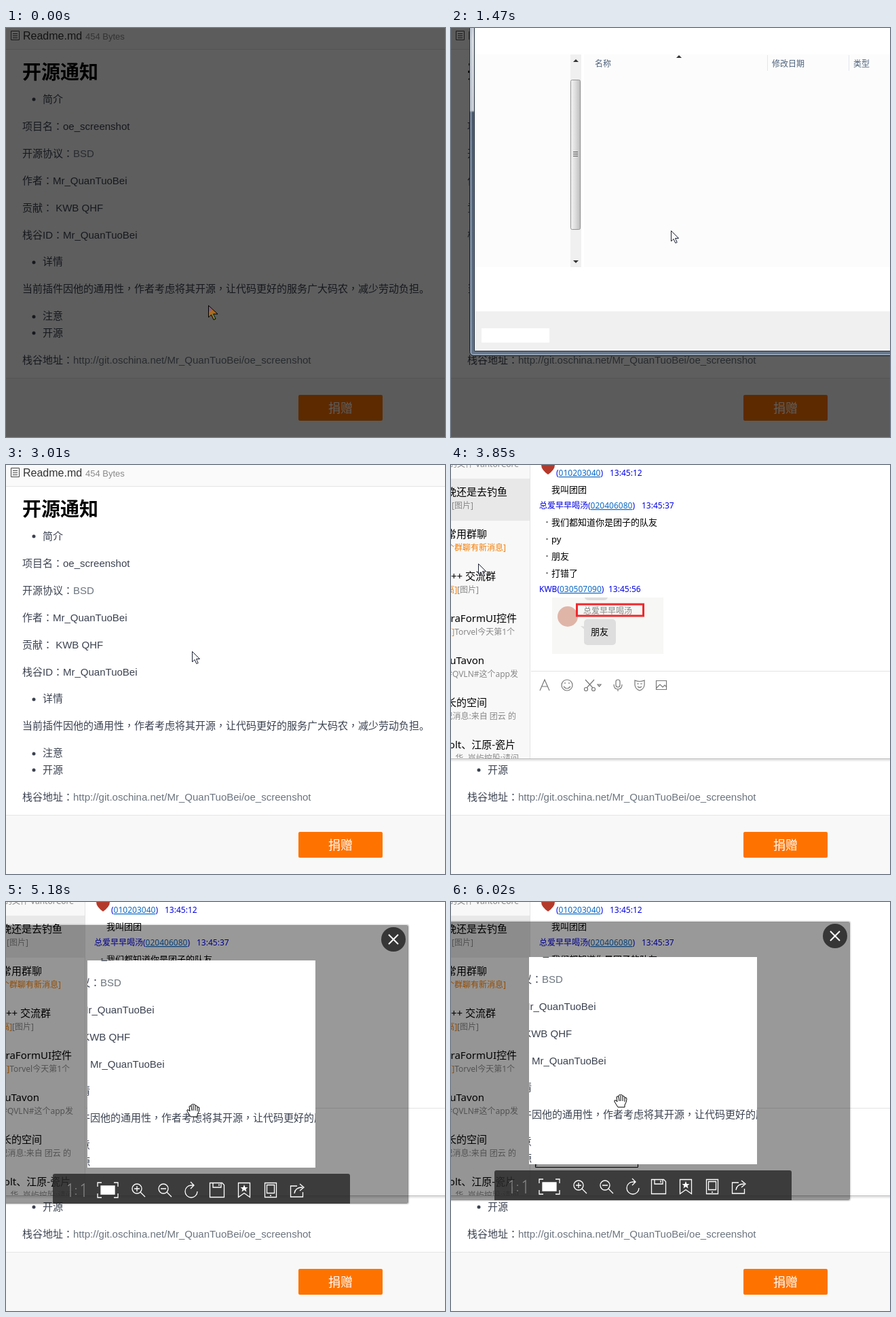
Animation, 647 px wide and 602 px high, one loop 6.09 s. Source, as an HTML page:

```html
<!DOCTYPE html>
<html lang="zh-CN">
<head>
<meta charset="utf-8">
<title>Screenshot demo</title>
<style>
html, body { margin: 0; width: 100%; height: 100%; overflow: hidden; background: #fff; }
#stage { display: block; }
text { font: 15px "Liberation Sans", "Noto Sans CJK SC", "Noto Sans CJK", sans-serif; fill: #3b4250; white-space: pre; }
.link { fill: #6b747e; }
.mid { font-family: "Noto Sans CJK TC", "Noto Sans CJK", sans-serif; }
#page .title { font-size: 28px; font-weight: bold; fill: #000; }
#page .file { font-size: 16px; fill: #333; }
#page .size { font-size: 13px; fill: #888; }
#page .donate { font-size: 18px; fill: #fff; }
#dialog text { font-size: 12px; fill: #4c607a; }
#chat text { font: 13px "Noto Sans", "Noto Sans CJK SC", "Noto Sans CJK", sans-serif; fill: #000; }
#chat .rows text { font-size: 15px; text-anchor: end; }
#chat .rows .sub { font-size: 12px; fill: #888; }
#chat .rows .hot { fill: #f57c00; }
#chat .who text { font-size: 12px; fill: #0000e6; }
#chat .who .num { fill: #0a68c4; text-decoration: underline; }
.line { fill: none; stroke: #777; stroke-width: 1.2; }
.white { fill: none; stroke: #fff; stroke-width: 1.3; }
.bold { stroke-width: 2; }
</style>
</head>
<body>
<svg id="stage" width="647" height="602" viewBox="0 0 647 602">
  <defs>
    <linearGradient id="grip"><stop stop-color="#f4f4f4"/><stop offset=".5" stop-color="#dcdcdc"/><stop offset="1" stop-color="#bcbcbc"/></linearGradient>
    <linearGradient id="glass" x2="0" y2="1"><stop stop-color="#66778b"/><stop offset=".2" stop-color="#d7dce2"/><stop offset=".38" stop-color="#c8ced6"/><stop offset=".385" stop-color="#4e5d70"/><stop offset="1" stop-color="#65758a"/></linearGradient>
  </defs>

  <g id="page">
    <path fill="#fff" d="M0 0H647V602H0z"/>
    <path fill="#fafafa" d="M0 0H647V31H0z"/>
    <path fill="#f8f8f8" d="M0 516H647V602H0z"/>
    <path stroke="#e5e5e5" d="M0 31.5H647M0 515.5H647"/>
    <path fill="none" stroke="#444" d="M7.500 4.500H19.500V17.500H7.500zM10 8.500h7M10 11.500h7M10 14.500h7"/>
    <text class="file" x="25" y="17">Readme.md</text>
    <text class="size" x="117" y="17">454 Bytes</text>
    <text class="title" x="24" y="75">开源通知</text>
    <g fill="#3b4250"><circle cx="41" cy="105" r="2.500"/><circle cx="41" cy="345" r="2.500"/><circle cx="41" cy="425" r="2.500"/><circle cx="41" cy="449" r="2.500"/></g>
    <text x="54" y="110">简介</text>
    <text x="24" y="150">项目名<tspan class="mid" lang="zh-TW">：</tspan>oe_screenshot</text>
    <text x="24" y="190">开源协议<tspan class="mid" lang="zh-TW">：</tspan><tspan class="link">BSD</tspan></text>
    <text x="24" y="230">作者<tspan class="mid" lang="zh-TW">：</tspan>Mr_QuanTuoBei</text>
    <text x="24" y="270">贡献<tspan class="mid" lang="zh-TW">：</tspan> KWB QHF</text>
    <text x="24" y="310">栈谷ID<tspan class="mid" lang="zh-TW">：</tspan>Mr_QuanTuoBei</text>
    <text x="54" y="349">详情</text>
    <text x="24" y="389">当前插件因他的通用性<tspan class="mid" lang="zh-TW">，</tspan>作者考虑将其开源<tspan class="mid" lang="zh-TW">，</tspan>让代码更好的服务广大码农<tspan class="mid" lang="zh-TW">，</tspan>减少劳动负担。</text>
    <text x="54" y="429">注意</text>
    <text x="54" y="454">开源</text>
    <text x="24" y="494">栈谷地址<tspan class="mid" lang="zh-TW">：</tspan><tspan class="link">http://git.oschina.net/Mr_QuanTuoBei/oe_screenshot</tspan></text>
    <rect x="431" y="540" width="124" height="38" rx="2" fill="#fe7300"/>
    <text class="donate" x="475" y="566">捐赠</text>
  </g>

  <g id="shade">
    <path id="veil" fill-opacity=".63" fill-rule="evenodd"/>
    <g id="selection">
      <path id="edge" fill="none" stroke="#1aa5e8"/>
      <path id="handles" stroke="#5a3a38" stroke-width="3" fill="none"/>
    </g>
  </g>

  <g id="dialog">
    <rect x="27.500" y="-100" width="700" height="582.500" rx="6" fill="url(#glass)" stroke="#1d2733"/>
    <path fill="none" stroke="#aab8c8" d="M29.500-100V478q0 2.500 3 2.500H720"/>
    <path fill="#fff" stroke="#25303d" d="M34.500-70H720V475.500H34.500z"/>
    <path fill="#fcfcfc" d="M35 39H176V352H35zM196 39H720V352H196z"/>
    <path fill="#f0f0f0" d="M35 417H720V475H35zM176 39H192V352H176z"/>
    <path fill="#fff" d="M45 442H145V463H45z"/>
    <rect x="176.500" y="76.500" width="14" height="220" rx="2" fill="url(#grip)" stroke="#959595"/>
    <path stroke="#555" d="M180 182.500h7M180 185.500h7M180 188.500h7"/>
    <path fill="#333" d="M180 50l4-4 4 4zM180 342l4 4 4-4zM332 44l4-4 4 4z"/>
    <path stroke="#e2e6ec" d="M466.500 40V63M586.500 40V63"/>
    <text x="212" y="57">名称</text><text x="473" y="57">修改日期</text><text x="593" y="57">类型</text>
  </g>

  <g id="chat">
    <path fill="#000" fill-opacity=".08" d="M0 432H647V436H0z"/>
    <path fill="#fff" d="M0 0H647V432H0z"/>
    <path fill="#f8f8f8" d="M0 0H116V432H0z"/>
    <path fill="#e8e8e8" d="M0 20H116V82H0z"/>
    <path stroke="#e3e3e3" d="M116.500 0V432M118 303.500H647"/>
    <svg class="rows" width="116" height="432">
      <text class="sub" x="100" y="3">的文件 VantorCore</text>
      <text x="83" y="45">晚还是去钓鱼</text><text class="sub" x="33" y="64">：[图片]</text>
      <text x="53" y="107">常用群聊</text><text class="sub hot" x="81" y="126">个群聊有新消息]</text>
      <text x="66" y="169">C++ 交流群</text><text class="sub" x="41" y="188"><tspan class="hot">高]</tspan>[图片]</text>
      <text x="97" y="231">eloraFormUI控件</text><text class="sub" x="94" y="250"><tspan class="hot">高]</tspan>Torvel今天第1个</text>
      <text x="49" y="293">的uTavon</text><text class="sub" x="99" y="312">发#QVLN#这个app发</text>
      <text x="53" y="355">长的空间</text><text class="sub" x="96" y="374">记消息:来自 团云 的</text>
      <text x="95" y="417">wolt、江原-瓷片</text><text class="sub" x="100" y="436">华..岚屿控股:请问</text>
    </svg>
    <path fill="#b5392b" d="M133 0H153Q153 7 143 14Q133 7 133 0z"/>
    <g class="who">
      <text x="155" y="16">(<tspan class="num">010203040</tspan>)</text><text x="234" y="16">13:45:12</text>
      <text x="130" y="64">总爱早早喝汤(<tspan class="num">020406080</tspan>)</text><text x="281" y="64">13:45:37</text>
      <text x="130" y="187">KWB(<tspan class="num">030507090</tspan>)</text><text x="232" y="187">13:45:56</text>
    </g>
    <text x="148" y="41">我叫团团</text>
    <text x="148" y="89">我们都知道你是团子的队友</text>
    <text x="148" y="114">py</text><text x="148" y="139">朋友</text><text x="148" y="164">打错了</text>
    <g fill="#777"><circle cx="141.500" cy="84" r="1.300"/><circle cx="141.500" cy="109" r="1.300"/><circle cx="141.500" cy="134" r="1.300"/><circle cx="141.500" cy="159" r="1.300"/></g>
    <path fill="#f7f7f5" d="M149 195H313V278H149z"/>
    <circle cx="172" cy="223" r="15" fill="#dfb5a8"/>
    <path fill="#ddd" d="M197 195H231Q230 199 225 199H203Q198 199 197 195zM191 237l8 1v6z"/>
    <text x="195" y="219" style="font-size:12px;fill:#888">总爱早早喝汤</text>
    <rect x="185.500" y="205" width="98" height="17" fill="none" stroke="#f0282d" stroke-width="3"/>
    <rect x="196" y="227" width="47" height="38" rx="5" fill="#dedede"/>
    <text x="206" y="250">朋友</text>
    <g class="line">
      <path d="M131 332L138 316 145 332M134 326H142"/>
      <circle cx="171" cy="324" r="8"/><path d="M166 326q5 6 10 0M168 320v2M174 320v2"/>
      <path d="M198 316L209 328M211 316L200 328M216 323h5l-2.500 3z"/><circle cx="199" cy="330" r="2.500"/><circle cx="210" cy="330" r="2.500"/>
      <rect x="243" y="316" width="6" height="11" rx="3"/><path d="M240 323q0 7 6 7t6-7M246 330v3"/>
      <path d="M271 317q7 3 14 0v7q-1 6-7 8-6-2-7-8zM274 322h3M279 322h3M275 326q3 3 6 0"/>
      <path d="M302.500 317.500h15v13h-15zM303 328l5-5 4 4 3-3 3 3"/>
    </g>
    <svg id="thumb" x="120" y="344" width="160" height="50" viewBox="120 344 160 50">
      <path fill="#fff" stroke="#000" d="M124.500 253.500H275.500V390.500H124.500z"/>
      <svg x="125" y="254" width="150" height="136" viewBox="80 152 336 305"><use href="#page"/></svg>
      <g fill="none" stroke="#888">
        <path d="M264 379l5 5" stroke-width="3.500"/>
        <circle cx="260" cy="375" r="6" fill="#fff" stroke-width="2.500"/>
        <path d="M257 375h6M260 372v6" stroke-width="1.500"/>
      </g>
    </svg>
    <path stroke="#b4b4b4" d="M0 432.500H647"/>
  </g>

  <g id="viewer">
    <rect x="-.5" y="-.5" width="610" height="411" rx="3" fill="none" stroke="#000" stroke-opacity=".12" stroke-width="2"/>
    <rect width="609" height="410" rx="3" fill-opacity=".4"/>
    <svg x="136" y="52" width="336" height="305" viewBox="80 152 336 305"><use href="#page"/></svg>
    <svg width="609" height="410">
      <g id="tools">
        <rect x="85" y="366" width="438" height="46" rx="3" fill="#2a2a2a" fill-opacity=".83"/>
        <g class="white">
          <path stroke="#888" d="M107 384l4-3V400M127 384l4-3V400M119 387v2M119 395v2"/>
          <path d="M151 385v-6h6M175 379h6v6M181 395v6h-6M157 401h-6v-6"/><path fill="#fff" d="M156 384h20v12h-20z"/>
          <circle cx="209" cy="388" r="7"/><path d="M214 393l7 7M205 388h8M209 384v8"/>
          <circle cx="248" cy="388" r="7"/><path d="M253 393l7 7M244 388h8"/>
          <path d="M298 392a9 9 0 1 1-9-9h3M288 378l5 5-5 5"/>
          <path d="M316.500 379.500h18l3 3v18h-21zM321 380v6h12v-6M330 381v3"/>
          <path d="M358.500 379.500h17v21l-8.500-6-8.500 6z"/>
          <path fill="#fff" stroke="none" d="M367 382l1.500 4h4l-3 2.500 1 4-3.500-2.500-3.500 2.500 1-4-3-2.500h4z"/>
          <path d="M397.500 379.500h17v21h-17zM400.500 382.500h11v12h-11zM405 398h2"/>
          <path d="M445 384h-9.500v16h18v-7M441 395q1-9 12-9M449 381l6 5-6 5"/>
        </g>
      </g>
    </svg>
    <g id="prev"><circle class="white bold" cx="30" cy="204" r="21"/><path class="white bold" d="M35 191L22 204 35 217"/></g>
    <g id="close"><circle cx="587" cy="21" r="18" fill="#2e2e2e" fill-opacity=".92"/><path class="white bold" d="M580 14l14 14M594 14l-14 14"/></g>
  </g>

  <g id="cursor" stroke-linejoin="round">
    <g id="pick"><path fill="#b06a1c" stroke="#000" d="M.5.5V18l4-4 3.500 7.500 3-1.500-3.500-7H14z"/><path fill="#75609a" d="M1 2v7l5-2z"/><path fill="#2f9b78" d="M6 13l3 7 1-1-3-6z"/></g>
    <path id="move" fill="#fff" stroke="#222" d="M0-11L4-6H2V-2H6V-4L11 0 6 4V2H2V6H4L0 11-4 6H-2V2H-6V4L-11 0-6-4V-2H-2V-6H-4z"/>
    <path id="arrow" fill="#fff" stroke="#1c2233" d="M.5.5V16l3.500-3.500 2.800 6 2.400-1-2.700-6H11.500z"/>
    <path id="hand" fill="#fff" stroke="#000" d="M-4 9L-9 1q-1-3 2-2l2 2-1-7q1-2 3 0v-2q1-2 3-1 2-1 3 1v1q2-1 3 1v1q3-1 3 2 0 4-3 9v3zM-3-6l1 6M0-8V0M3-7V0M6-5V1"/>
  </g>
</svg>
<script>
const LOOP = 6090, TICK = 70;
const SIZE = { w: 336, h: 305 };
const ANCHOR = { x: 33, y: 102 };
const $ = id => document.getElementById(id);

// Each key is [time, x, y]
const selectionPath = [[630, 33, 102], [700, 179, 109], [840, 195, 105], [1050, 20, 150], [1190, 80, 152]];
const dialogPath = [[1820, 0, 0], [2170, -6, 40], [2450, -15, 48]];
const viewerPath = [[4760, 195, 103], [5040, 60, 50], [5180, -16, 34], [5450, -30, 18], [5670, -16, 34], [6020, -21, 29]];
const follow = (path, dx, dy) => path.map(([t, x, y]) => [t, x + dx, y + dy]);
const cursorPath = [
  [0, 298, 408], [210, 33, 102], [490, 369, 407], [560, 256, 293],
  ...follow(selectionPath, 223, 191),
  [1330, 303, 343], [1470, 324, 298], [1750, 400, -30], [2170, 330, -30], [2450, 222, 247],
  [2730, 655, 480], [3009, 655, 480], [3010, 274, 274], [3080, 274, 274], [3150, 260, 272], [3220, 317, 269],
  [3360, 317, 269], [3710, 20, 100], [3780, 20, 100], [4200, 140, 370], [4410, 204, 352], [4550, 204, 360],
  ...follow(viewerPath.slice(0, -1), 292, 273), [6020, 250, 293]
];

const clamp = v => Math.max(0, Math.min(1, v));
const mix = (a, b, k) => a + (b - a) * k;

function at(path, t) {
  const i = path.findIndex(key => key[0] > t);
  if (i < 0) return path[path.length - 1].slice(1);
  if (i === 0) return path[0].slice(1);
  const [t0, x0, y0] = path[i - 1], [t1, x1, y1] = path[i];
  const k = (t - t0) / (t1 - t0);
  return [Math.round(mix(x0, x1, k)), Math.round(mix(y0, y1, k))];
}

const show = (id, on) => $(id).style.display = on ? "" : "none";
const place = (id, [x, y]) => $(id).setAttribute("transform", `translate(${x} ${y})`);
const fade = (id, k) => { show(id, k > 0); $(id).style.opacity = k; };

function drawSelection(t, [cx, cy]) {
  const on = t > 210;
  const [x, y] = at(selectionPath, t);
  let { w, h } = SIZE;
  if (t < 490) [w, h] = [Math.max(1, cx - ANCHOR.x), Math.max(1, cy - ANCHOR.y)];
  show("selection", on);
  $("veil").setAttribute("d", "M0 0H647V602H0z" + (on ? `M${x} ${y}h${w}v${h}h${-w}z` : ""));
  $("edge").setAttribute("d", `M${x + w} ${y - .5}H${x - .5}V${y + h}`);
  const dots = [];
  for (const i of [0, .5, 1]) for (const j of [0, .5, 1])
    if (i !== .5 || j !== .5) dots.push(`M${x + w * i - 2} ${y + h * j}h4`);
  $("handles").setAttribute("d", dots.join(""));
}

function draw(t) {
  const cursor = at(cursorPath, t);
  show("shade", t < 3010);
  if (t < 3010) drawSelection(t, cursor);

  fade("dialog", t < 3010 ? clamp((t - 1330) / 140) : 0);
  place("dialog", at(dialogPath, t));

  fade("chat", clamp((t - 3290) / 280));
  show("thumb", t >= 4060);

  fade("viewer", clamp((t - 4410) / 140));
  place("viewer", at(viewerPath, t));
  place("tools", [0, t < 4550 ? 44 : t < 4620 ? 12 : 0]);
  show("prev", t < 4690);
  show("close", t >= 4690);

  const mode = t < 560 ? "pick" : t < 1400 ? "move" : t < 4480 ? "arrow" : "hand";
  for (const id of ["pick", "move", "arrow", "hand"]) show(id, id === mode);
  place("cursor", cursor);
}

const start = performance.now();
function frame() {
  const t = (performance.now() - start) % LOOP;
  draw(Math.floor(t / TICK) * TICK);
  requestAnimationFrame(frame);
}
frame();
</script>
</body>
</html>
```
